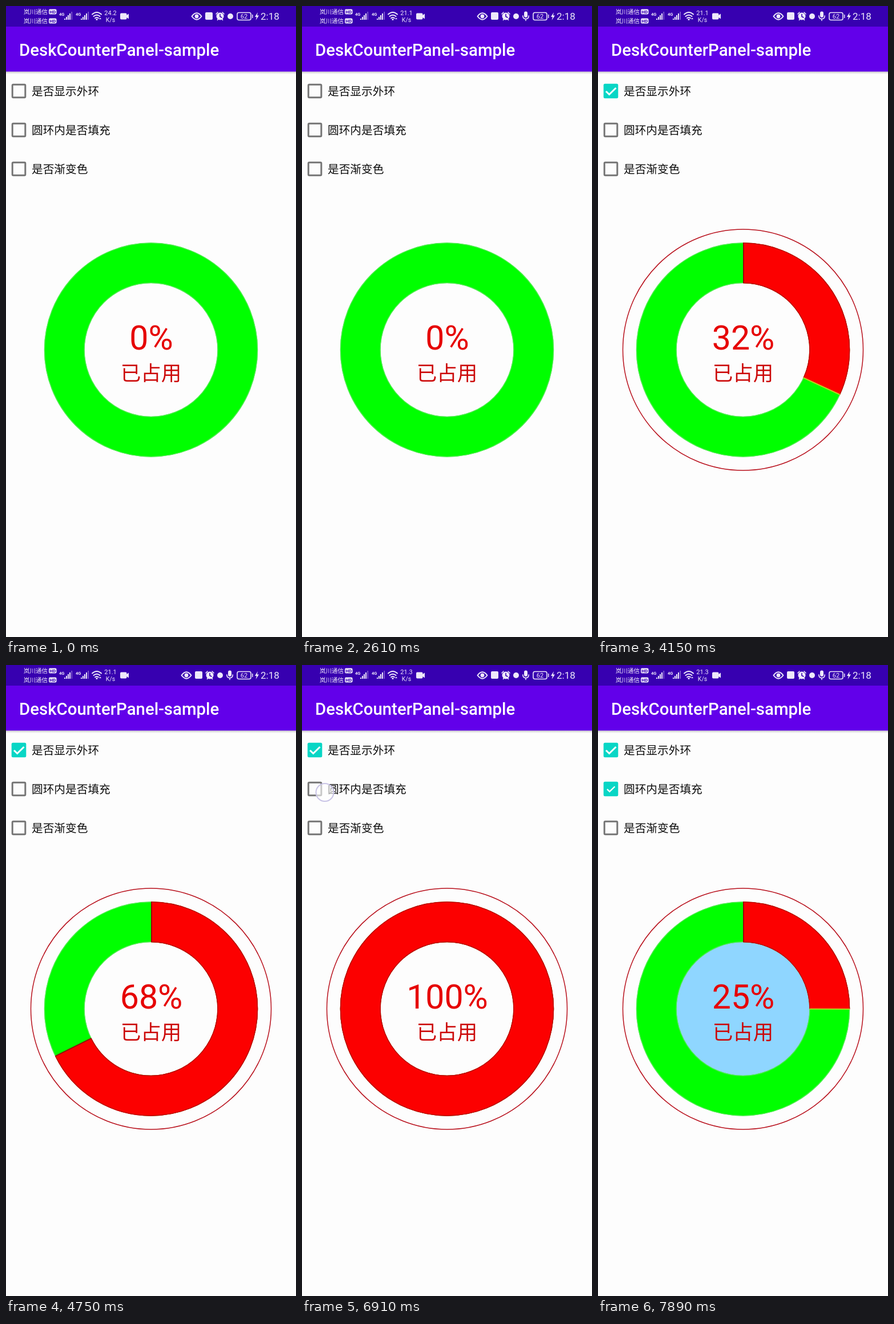
These frames come from a looping animation (508 px wide and 1102 px high, 7.99 s). An HTML page:

```html
<!DOCTYPE html>
<html lang="zh-CN">
<head>
<meta charset="utf-8">
<title>Usage ring</title>
<style>
  html, body { margin: 0; width: 100%; height: 100%; overflow: hidden; background: #fdfdfd; }
  svg { display: block; width: 508px; height: 1102px; }
  text { font-family: Roboto, "Noto Sans CJK SC", "Noto Sans CJK JP", "Noto Sans CJK", sans-serif; }
  .line { fill: none; stroke: #eee9fa; stroke-width: 1.6; stroke-linecap: round; stroke-linejoin: round; }
  .mid { text-anchor: middle; }
</style>
</head>
<body>
<svg viewBox="0 0 508 1102">
  <defs>
    <linearGradient id="shade" x2="0" y2="1">
      <stop stop-color="#000" stop-opacity=".22"/>
      <stop offset="1" stop-color="#000" stop-opacity="0"/>
    </linearGradient>
    <g id="carrier">
      <text x="31" y="14" font-size="10.5">岚川通信</text>
      <rect x="75" y="5.5" width="13.5" height="9" rx="2"/>
      <text x="81.7" y="13" font-size="8" font-weight="700" fill="#3700b3" class="mid">HD</text>
    </g>
    <g id="signal">
      <text x="93" y="17" font-size="7.5" font-weight="700">4G</text>
      <path d="M102 22h2v2h-2zM105 19h2v5h-2zM108 16h2v8h-2zM111 13h2v11h-2z"/>
      <path d="M114.5 10h1.5v14h-1.5z" opacity=".45"/>
    </g>
  </defs>

  <rect width="508" height="1102" fill="#fdfdfd"/>
  <rect y="114" width="508" height="5" fill="url(#shade)"/>
  <rect width="508" height="114.5" fill="#6200ea"/>
  <rect width="508" height="36" fill="#3700b0"/>
  <text x="23" y="87" font-size="29.4" font-weight="500" fill="#fff">DeskCounterPanel-sample</text>

  <g fill="#eee9fa">
    <use href="#carrier"/>
    <use href="#carrier" y="16"/>
    <use href="#signal"/>
    <use href="#signal" x="29"/>
    <path class="line" style="stroke-width:2" d="M151 14.5q8 -7 16 0M153.5 18q5.5 -4.6 11 0M156 21.2q3 -2.5 6 0"/>
    <circle cx="159" cy="23.5" r="1.6"/>
    <path d="M163 23l2 -2.5 2 2.5z"/>
    <text id="speed" x="183" y="16" font-size="11" class="mid"></text>
    <text x="183" y="28" font-size="10.5" class="mid">K/s</text>
    <path d="M202 12.5h7.5q2 0 2 2v1.5l3.5 -2.5v9l-3.5 -2.5v1.5q0 2 -2 2h-7.5q-2 0 -2 -2v-7q0 -2 2 -2z"/>

    <g id="icons">
      <path class="line" style="stroke-width:2" d="M325.5 18q8.500 -11.500 17 0q-8.500 11.500 -17 0z"/>
      <circle cx="334" cy="18" r="3.4"/>
      <rect x="349" y="11" width="13" height="13" rx="2"/>
      <circle cx="375" cy="18" r="6.5"/>
      <path class="line" d="M368 14l3 -3M382 14l-3 -3M370.500 24.500l1 -1.500M379.500 24.500l-1 -1.500"/>
      <path class="line" style="stroke:#3700b0" d="M375 14.500v4l3 1.500"/>
      <circle cx="393" cy="18" r="5"/>
    </g>
    <g id="mic">
      <rect x="389" y="9.500" width="6" height="10.500" rx="3"/>
      <path class="line" d="M386.800 17q0 5.500 5.200 5.500t5.200 -5.500M392 22.500v3"/>
    </g>

    <rect class="line" x="405" y="11.500" width="24" height="13" rx="3"/>
    <path d="M431 15h1.500v6h-1.500zM441 11l-5 8h3l-1.500 6 5.500 -8.500h-3.200z"/>
    <text x="417" y="22" font-size="11" class="mid">62</text>
    <text x="446" y="24" font-size="17">2:18</text>
  </g>

  <g id="options"></g>

  <g fill="none">
    <circle id="hoop" cx="254" cy="600.5" r="210.500" stroke="#b8101c" stroke-width="1.500"/>
    <circle id="core" cx="254" cy="600.5" r="117" fill="#8fd6ff"/>
    <circle cx="254" cy="600.5" r="151.750" stroke="#00ff00" stroke-width="70.500"/>
    <g stroke="#48ec48" stroke-width="1.500">
      <circle cx="254" cy="600.5" r="186.500"/>
      <circle cx="254" cy="600.5" r="117"/>
    </g>
    <g id="used" transform="rotate(-90 254 600.5)">
      <circle cx="254" cy="600.5" r="151.750" stroke="#fc0000" stroke-width="71" pathLength="100"/>
      <g stroke="#c00404" stroke-width="1.500">
        <circle cx="254" cy="600.5" r="186.500" pathLength="100"/>
        <circle cx="254" cy="600.5" r="117" pathLength="100"/>
      </g>
    </g>
    <g id="edges" stroke-width="2">
      <path id="tip" d="M254 413.500V484"/>
      <path d="M255 413.500V484" stroke="#a00008"/>
    </g>
  </g>
  <text id="percent" x="254.500" y="600" font-size="59" fill="#e60000" class="mid"></text>
  <text x="254" y="653.500" font-size="35.500" fill="#cc0808" class="mid">已占用</text>

  <circle id="ripple" cx="23"/>
  <circle id="finger" r="15.500" fill="#fff" fill-opacity=".6" stroke="#c9c4e6" stroke-width="2"/>
</svg>

<script>
const LOOP = 7990;
const FIRST = 3003, SECOND = 6940;      // the moments the two boxes become ticked
const rowY = [148.5, 216.5, 284.5];
const $ = id => document.getElementById(id);
const set = (el, attrs) => { for (const k in attrs) el.setAttribute(k, attrs[k]); };
const show = (id, on) => set($(id), { visibility: on ? "visible" : "hidden" });
const ramp = (t, a, b) => Math.min(1, Math.max(0, (t - a) / (b - a)));

$("options").innerHTML = ["是否显示外环", "圆环内是否填充", "是否渐变色"].map((label, i) => `
  <g transform="translate(22.500 ${rowY[i]})">
    <rect class="empty" x="-11.300" y="-11.300" width="22.600" height="22.600" rx="1.500"
      fill="none" stroke="#757575" stroke-width="3"/>
    <g class="full">
      <rect x="-12.800" y="-12.800" width="25.600" height="25.600" rx="2.500" fill="#08d6c5"/>
      <path class="tick" d="M-8.500 .5L-2.800 6L9 -5.500" fill="none" stroke="#fff" stroke-width="3"/>
    </g>
  </g>
  <text x="45" y="${rowY[i] + 7.5}" font-size="19.700" fill="#0c0c0c">${label}</text>`).join("");
const boxes = [...document.querySelectorAll("#options > g")];

// Progress of the ring's animator as [time, fraction] points, eased in and out by a cosine.
const runs = [
  [[FIRST, 0], [4150, .3815], [4750, .615], [6020, 1]],
  [[SECOND, 0], [7890, 1 / 3], [7990, .368]]
];

function usage(t) {
  const keys = runs[t < SECOND ? 0 : 1];
  let x = 0;
  for (let i = 1; i < keys.length; i++) {
    const [a, from] = keys[i - 1], [b, to] = keys[i];
    if (t >= a) x = from + (to - from) * ramp(t, a, b);
  }
  return 50 * (1 - Math.cos(Math.PI * x));
}

function drawBox(box, age) {
  const on = age >= 0;
  box.querySelector(".empty").style.display = on ? "none" : "";
  box.querySelector(".full").style.display = on ? "" : "none";
  const dip = 1 - .1 * Math.sin(Math.PI * ramp(age, 0, 700));
  set(box.querySelector(".full"), { transform: `scale(${dip})` });
  set(box.querySelector(".tick"), { transform: `scale(${ramp(age, 350, 1130)})` });
}

function drawTouch(t) {
  const late = t > 6500, age = t - (late ? SECOND : FIRST);
  set($("ripple"), {
    cy: rowY[late ? 1 : 0],
    r: 10 + 18 * ramp(age, 0, 260),
    opacity: age < 0 ? 0 : .12 * (1 - ramp(age, 450, 850))
  });
  set($("finger"), {
    cx: late ? 40 : 37,
    cy: late ? 222.5 : 151,
    opacity: ramp(age, -170, -110) * (1 - ramp(age, 200, 470))
  });
}

function drawRing(t) {
  const p = usage(t), partial = p > .05 && p < 99.95;
  show("hoop", t >= FIRST);
  show("core", t >= SECOND);
  show("used", p > .05);
  show("edges", partial);
  set($("used"), { "stroke-dasharray": p > 99.95 ? "none" : `${p} 100` });
  set($("tip"), { transform: `rotate(${p * 3.6} 254 600.5)`, stroke: p < 50 ? "#b8d020" : "#8c1808" });
  $("percent").textContent = Math.round(p) + "%";
}

function draw(t) {
  const recording = t >= 400;
  $("speed").textContent = !recording ? "24.2" : t < 6400 ? "21.1" : "21.3";
  set($("icons"), { transform: `translate(${recording ? -18 : 0} 0)` });
  show("mic", recording);
  [FIRST, SECOND, Infinity].forEach((start, i) => drawBox(boxes[i], t - start));
  drawRing(t);
  drawTouch(t);
}

const begin = performance.now();
function tick() {
  draw((performance.now() - begin) % LOOP);
  requestAnimationFrame(tick);
}
tick();
</script>
</body>
</html>
```
